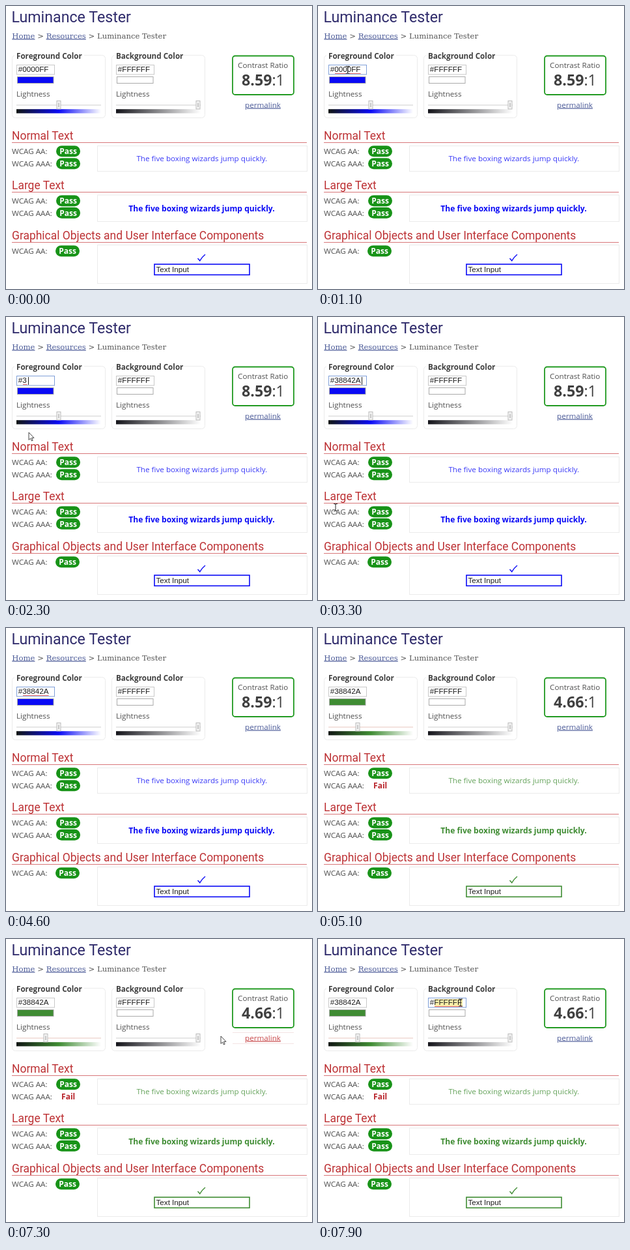
An HTML page for the animation above (8 s loop, 470 px wide and 434 px high).

```html
<!DOCTYPE html>
<html lang="en">
<head>
<meta charset="utf-8">
<title>Luminance Tester</title>
<style>
  html, body { margin: 0; width: 470px; height: 434px; overflow: hidden; background: #fff; }
  svg { display: block; --fg: #0a0af5; }
  text { font: 11.66px "Open Sans", sans-serif; fill: #505050; white-space: pre; }
  .title { font: 23.2px Roboto, sans-serif; fill: #302c6c; }
  .head { font: 17.46px Roboto, sans-serif; fill: #bd3235; }
  .crumbs { font-family: "DejaVu Serif", serif; fill: #555; }
  .link { fill: #4c5b98; text-decoration: underline; }
  .bold { font-weight: 700; }
  .legend { fill: #3f3f3f; }
  .mid { text-anchor: middle; }
  .field { font-family: "Liberation Sans", Arial, sans-serif; fill: #1c1c1c; }
  .ratio { font-size: 23.2px; fill: #404040; }
  .badge { font-size: 12px; font-weight: 700; text-anchor: middle; fill: #fff; }
  .fail { fill: #b8232a; }
  .thin { opacity: .8; }
  .big { font-size: 12.1px; font-weight: 700; }
  .tint { fill: var(--fg); }
  .edge { stroke: var(--fg); fill: none; }
  .box { fill: #fff; stroke: #ebebeb; }
  .rule { stroke: #d8777a; }
  .hot { fill: #c8484a; }
  stop.mid-tone { stop-color: var(--fg); }
</style>
</head>
<body>
<svg id="stage" width="470" height="434" viewBox="0 0 470 434">
  <defs>
    <linearGradient id="fgRamp">
      <stop offset="0" stop-color="#101512"/><stop offset=".5" class="mid-tone"/><stop offset="1" stop-color="#fff"/>
    </linearGradient>
    <linearGradient id="bgRamp">
      <stop offset="0" stop-color="#14141a"/><stop offset="1" stop-color="#fff"/>
    </linearGradient>
  </defs>

  <text class="title" x="8.5" y="25">Luminance Tester</text>
  <text class="crumbs" x="9.3" y="49.5"><tspan class="link">Home</tspan> &gt; <tspan class="link">Resources</tspan> &gt; Luminance Tester</text>

  <g id="panels"></g>

  <rect x="348" y="76.5" width="94" height="59.5" rx="4" fill="#fff" stroke="#219a21" stroke-width="1.8"/>
  <text class="mid" x="394.7" y="95">Contrast Ratio</text>
  <text class="ratio mid" x="395" y="122"><tspan class="bold" id="ratio">8.59</tspan>:1</text>
  <path id="hoverLines" d="M348 143.5H442M348 160.5H442" stroke="#f3e3e3"/>
  <text class="link mid" id="permalink" x="394.5" y="155.5">permalink</text>

  <g id="sections"></g>

  <text class="tint mid thin" x="300.8" y="238.3">The five boxing wizards jump quickly.</text>
  <text class="tint mid big" x="300.5" y="315">The five boxing wizards jump quickly.</text>
  <path class="edge" d="M294.5 387L297.8 390.7Q301 385 306 381" stroke-width="1.4"/>
  <rect class="edge" x="228" y="396" width="146" height="16.3" stroke-width="1.6"/>
  <text class="field" x="230.5" y="407.5">Text Input</text>

  <g id="cursor">
    <path id="arrow" d="M0 0V11.5L2.7 9.1L4.4 13L6.2 12.2L4.5 8.4H8Z" fill="#fff" stroke="#333" stroke-width=".9"/>
    <path id="beam" d="M-3-5.5H-1L0-4.5L1-5.5H3M0-4.5V4.5M-3 5.5H-1L0 4.5L1 5.5H3" fill="none" stroke="#333" stroke-width="1.1"/>
    <path id="hand" d="M-1.5 1Q0-.8 1.4 1V6L3.5 5.5L4 6.5L6 6.2L6.5 7.3L8 7.5V12.5L6.5 16H-.5L-5 10.5Q-4.5 8.3-2.8 9.2L-1.5 10.5Z" fill="#fff" stroke="#222"/>
  </g>
</svg>
<script>
const LOOP = 8000, STEP = 100, SUBMIT = 5000;
const $ = id => document.getElementById(id);

const panel = (id, x, label) => `
  <rect class="box" x="${x + .5}" y="75.5" width="143" height="96" rx="5"/>
  <rect x="${x + 4}" y="70" width="107" height="12" fill="#fff"/>
  <text class="bold legend" x="${x + 7}" y="80.7">${label}</text>
  <rect id="${id}Box" x="${x + 7.5}" y="90.5" width="58" height="14.5" fill="#fff"/>
  <rect id="${id}Mark" x="${x + 17}" y="92" height="12" fill="#fcf0a9"/>
  <text class="field" id="${id}Text" x="${x + 9.8}" y="101"></text>
  <path id="${id}Spell" stroke="#e26060" fill="none"/>
  <rect x="${x + 8.5}" y="108.5" width="55.5" height="10" stroke="#aaa" fill="${id == 'fg' ? 'var(--fg)' : '#fff'}"/>
  <text x="${x + 7}" y="139.4">Lightness</text>
  <rect id="${id}Track" x="${x + 7}" y="151" width="130" height="2" fill="#e6e6e6"/>
  <rect x="${x + 7}" y="158.2" width="130" height="6.3" fill="url(#${id}Ramp)"/>
  <g id="${id}Thumb"><rect x="-3" y="145.5" width="6" height="12.5" fill="#f4f4f4" stroke="#bbb"/>
  <path d="M0 148.5V155" stroke="#bbb" stroke-width="1.6"/></g>`;

$('panels').innerHTML = panel('fg', 9, 'Foreground Color') + panel('bg', 162, 'Background Color') +
  '<path id="caret" d="M67.5 92V104" stroke="#222"/>';

const grade = (y, name, id = '', x = 77) => `
  <text x="9" y="${y}">WCAG ${name}:</text>
  <rect id="${id}" x="${x}" y="${y - 12.8}" width="37" height="17" rx="8.5" fill="#189318"/>
  <text class="badge" id="${id && id + 'Text'}" x="${x + 18.7}" y="${y}">Pass</text>`;

const section = (y, title, boxY, boxH) => `
  <text class="head" x="9" y="${y}">${title}</text>
  <path class="rule" d="M9 ${y + 4.9}H462"/>
  <rect class="box" x="140.5" y="${boxY}" width="322" height="${boxH}"/>`;

$('sections').innerHTML =
  section(204.6, 'Normal Text', 214.5, 39) + grade(227, 'AA') + grade(246, 'AAA', 'strict') +
  section(280.6, 'Large Text', 290, 40.5) + grade(303, 'AA') + grade(321.5, 'AAA') +
  section(357.6, 'Graphical Objects and User Interface Components', 366.5, 59) + grade(380, 'AA', '', 76);

// time, x, y, shape leaving that point
const path = [
  [300, 5, 288, 'arrow'], [700, 30, 180, 'arrow'], [1000, 46, 98, 'beam'],
  [1500, 44, 98, 'beam'], [1800, 42, 105, 'hand'], [2000, 42, 105, 'hand'],
  [2200, 37, 150, 'arrow'], [2700, 27, 285, 'beam'], [3000, 27, 292, 'beam'], [3500, 27, 292, ''],
  [6500, 458, 384, 'arrow'], [6900, 428, 230, 'arrow'], [7100, 395, 152, 'hand'],
  [7200, 362, 150, 'arrow'], [7300, 330, 149, 'arrow'], [7500, 262, 120, 'arrow'],
  [7600, 225, 98, 'beam'], [7700, 219, 97.5, 'beam'], [LOOP, 219, 97.5, '']
];
const typed = '38842A', keyTimes = [2300, 2450, 2600, 2750, 2900, 3100];

const set = (id, attrs) => { for (const k in attrs) $(id).setAttribute(k, attrs[k]); };
const show = (id, on) => set(id, { visibility: on ? 'visible' : 'hidden' });

function moveCursor(t) {
  const i = path.findIndex((p, n) => n + 1 < path.length && t >= p[0] && t < path[n + 1][0]);
  const shape = i < 0 ? '' : path[i][3];
  for (const s of ['arrow', 'beam', 'hand']) show(s, s === shape);
  if (!shape) return;
  const [t0, x0, y0] = path[i], [t1, x1, y1] = path[i + 1];
  const k = (t - t0) / (t1 - t0);
  set('cursor', { transform: `translate(${x0 + (x1 - x0) * k} ${y0 + (y1 - y0) * k})` });
}

function drawField(id, x, value, focused, selected) {
  const count = value.length - 1;
  const width = count * (id === 'bg' ? 7.09 : 6.6);
  $(id + 'Text').textContent = value;
  set(id + 'Box', { stroke: focused ? '#7f9fd8' : '#c8c8c8' });
  set(id + 'Mark', { width: selected ? width + .5 : 0 });
  set(id + 'Spell', { d: focused && count ? `M${x} 103.5h${width}` : '' });
}

function draw(now) {
  const t = Math.floor(now % LOOP / STEP) * STEP;
  const done = t >= SUBMIT;
  const keys = keyTimes.filter(k => t >= k).length;
  const focused = t >= 1100 && !done;
  const lastKey = keyTimes[keys - 1];

  $('stage').style.setProperty('--fg', done ? '#3f8c33' : '#0a0af5');
  drawField('fg', 26, '#' + (keys ? typed.slice(0, keys) : '0000FF'), focused, focused && t >= 1400 && !keys);
  drawField('bg', 179, '#FFFFFF', t >= 7700, t >= 7800);
  show('caret', focused && keys && (t - lastKey) % 1000 < 500);
  set('caret', { transform: `translate(${(keys - 6) * 6.6} 0)` });

  set('fgThumb', { transform: `translate(${done ? 61 : 81} 0)` });
  set('bgThumb', { transform: 'translate(295 0)' });
  set('fgTrack', { fill: done ? '#f3e2de' : '#e6e6e6' });
  $('ratio').textContent = done ? '4.66' : '8.59';
  show('strict', !done);
  $('strictText').textContent = done ? 'Fail' : 'Pass';
  $('strictText').classList.toggle('fail', done);

  const hover = t >= 7100 && t < 7400;
  $('permalink').classList.toggle('hot', hover);
  show('hoverLines', hover);
  moveCursor(t);
}

const start = performance.now();
function tick() {
  draw(performance.now() - start);
  requestAnimationFrame(tick);
}
tick();
</script>
</body>
</html>
```
